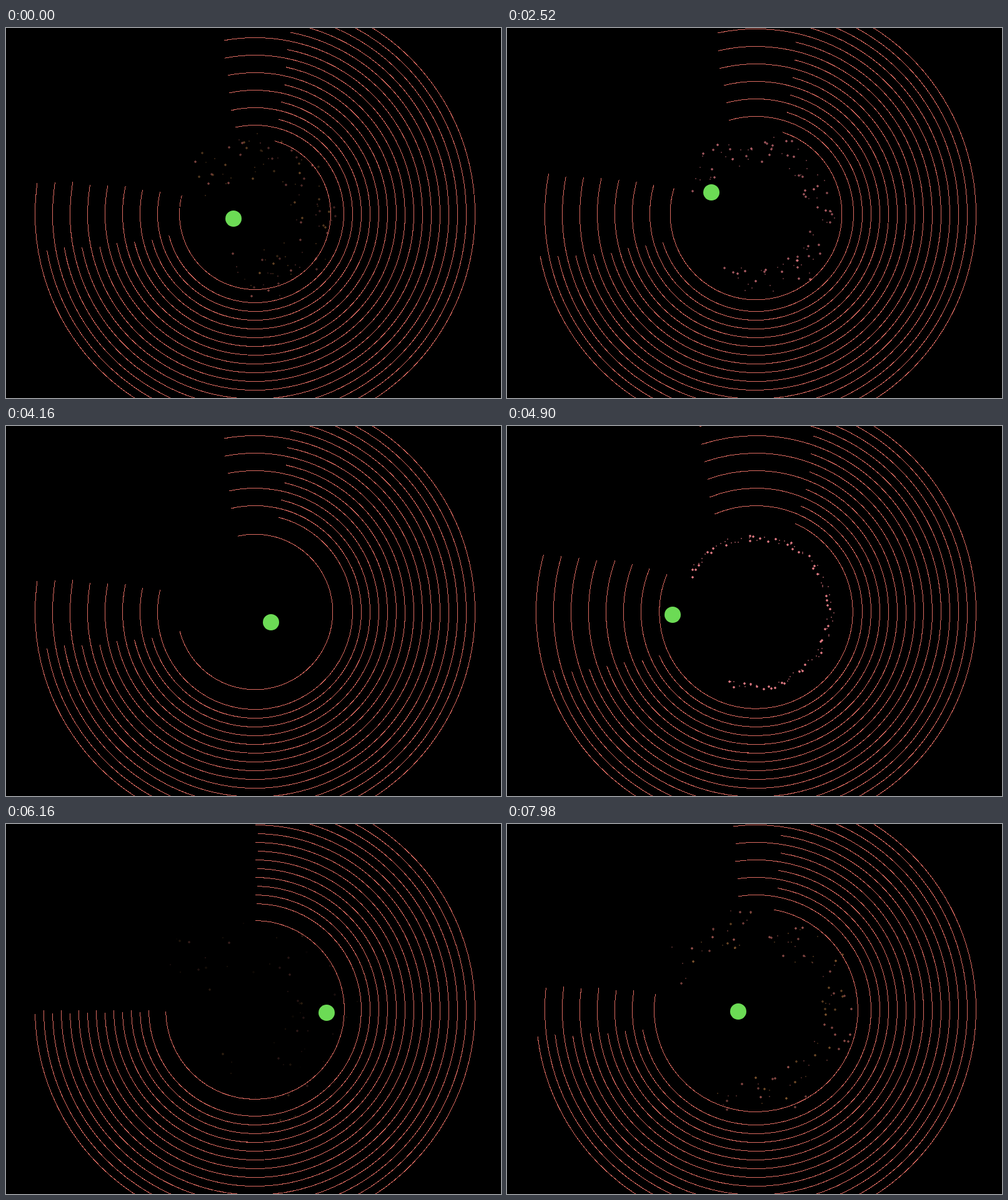
Write an HTML page that moves like this. It is 792 px wide and 592 px high and loops after 8000 ms.

```html
<!DOCTYPE html>
<html lang="en">
<head>
<meta charset="utf-8">
<title>Ring escape</title>
<style>
  html, body { margin: 0; width: 100%; height: 100%; overflow: hidden; background: #000; }
  svg { display: block; width: 792px; height: 592px; }
</style>
</head>
<body>
<svg id="stage" viewBox="0 0 792 592" xmlns="http://www.w3.org/2000/svg">
  <rect width="792" height="592" fill="#000"/>
  <g id="sparks"></g>
  <g id="rings" fill="none" stroke="#dc6a60" stroke-width="1" shape-rendering="crispEdges"></g>
  <circle id="ball" r="13" fill="#6cdb55"/>
</svg>
<script>
const LOOP = 8000, CX = 398.5, CY = 297.5;
const RINGS = 17, OUTER = 352, GAP = 14, SHRINK = 0.00295, SPARKS = 104;
const RAD = Math.PI / 180;

// Steps at which a ring breaks; the next one then starts to shrink.
const BREAKS = [-19, 43, 102.3, 156.7];

// Swing of the outermost ring: [step, degrees]; it turns back at every break.
const SWING = [[0, 8.7], [42.6, -17.2], [102.3, 16.85], [156.7, -14.7], [171, -6.35]];

// Ball path: [step, x, y], straight between bounces.
const PATH = [
  [0, 364, 305], [17.2, 496, 324.8], [31, 395, 289], [47.8, 280.5, 248.5],
  [54, 327, 263], [78.7, 511, 320], [88, 424, 314], [105, 265, 302],
  [105.8, 257.5, 301.4], [132, 513, 302], [133.4, 527, 302.2],
  [160.7, 244, 280], [171, 370, 300]
];

const $ = id => document.getElementById(id);

function add(parent, tag) {
  const el = document.createElementNS("http://www.w3.org/2000/svg", tag);
  return parent.appendChild(el);
}

function track(keys, n, i) {
  let k = 1;
  while (k < keys.length - 1 && n > keys[k][0]) k++;
  const a = keys[k - 1], b = keys[k];
  return a[i] + (b[i] - a[i]) * (n - a[0]) / (b[0] - a[0]);
}

function rand(seed) {
  let h = Math.imul(seed + 1, 0x9E3779B1);
  h = Math.imul(h ^ h >>> 15, 0x85EBCA6B);
  h = Math.imul(h ^ h >>> 13, 0xC2B2AE35);
  return ((h ^ h >>> 16) >>> 0) / 4294967296;
}

const rings = Array.from({ length: RINGS }, () => add($("rings"), "path"));
const sparks = Array.from({ length: SPARKS }, () => add($("sparks"), "path"));

// The picture steps in groups of three: 100, 20 and 20 ms.
function stepAt(t) {
  const r = t % 140;
  return 3 * Math.floor(t / 140) + (r >= 120 ? 2 : r >= 100 ? 1 : 0);
}

function arc(r, from, to) {
  const at = a => (CX + r * Math.cos(a * RAD)).toFixed(2) + " " + (CY + r * Math.sin(a * RAD)).toFixed(2);
  return `M${at(from)}A${r} ${r} 0 1 1 ${at(to)}`;
}

function drawRings(n, stage) {
  const swing = track(SWING, n, 1), inner = RINGS - 1 - stage;
  rings.forEach((el, k) => {
    if (k > inner) return el.setAttribute("d", "");
    let r = OUTER - GAP * k;
    if (k === inner) r *= Math.exp(-SHRINK * (n - BREAKS[stage]));
    const turn = swing * (1 + 0.04 * k) * (k % 2 ? -1 : 1);
    el.setAttribute("d", arc(r, Math.ceil(270 + turn), Math.floor(540 + turn)));
  });
}

function drawSparks(n, stage) {
  const age = n - BREAKS[stage];
  const radius = [94, 106.5, 119.3, 132.8][stage];
  sparks.forEach((el, i) => {
    const rnd = j => rand(stage * 4000 + i * 7 + j);
    const alpha = 1 - age / (25 + 15 * rnd(0));
    if (alpha <= 0) return el.setAttribute("d", "");
    const a = (209 + 266 * i / SPARKS) * RAD;
    const x = Math.round(CX + radius * Math.cos(a) + (rnd(1) * 4 - 2) * age);
    const y = Math.round(CY + radius * Math.sin(a) + (rnd(2) * 4 - 2) * age);
    const s = rnd(3) < 0.45 ? 1 : 2.2;
    el.setAttribute("d", `M${x - s} ${y}l${s} ${-s}l${s} ${s}l${-s} ${s}z`);
    el.setAttribute("fill", age < 14 ? "#f5858f" : rnd(4) < 0.5 ? "#ee8078" : "#c88648");
    el.setAttribute("opacity", alpha.toFixed(2));
  });
}

function draw(t) {
  const n = stepAt(t);
  const stage = BREAKS.filter(b => b <= n).length - 1;
  drawRings(n, stage);
  drawSparks(n, stage);
  $("ball").setAttribute("cx", track(PATH, n, 1).toFixed(2));
  $("ball").setAttribute("cy", track(PATH, n, 2).toFixed(2));
}

const start = performance.now();
function tick() {
  draw((performance.now() - start) % LOOP);
  requestAnimationFrame(tick);
}
tick();
</script>
</body>
</html>
```
